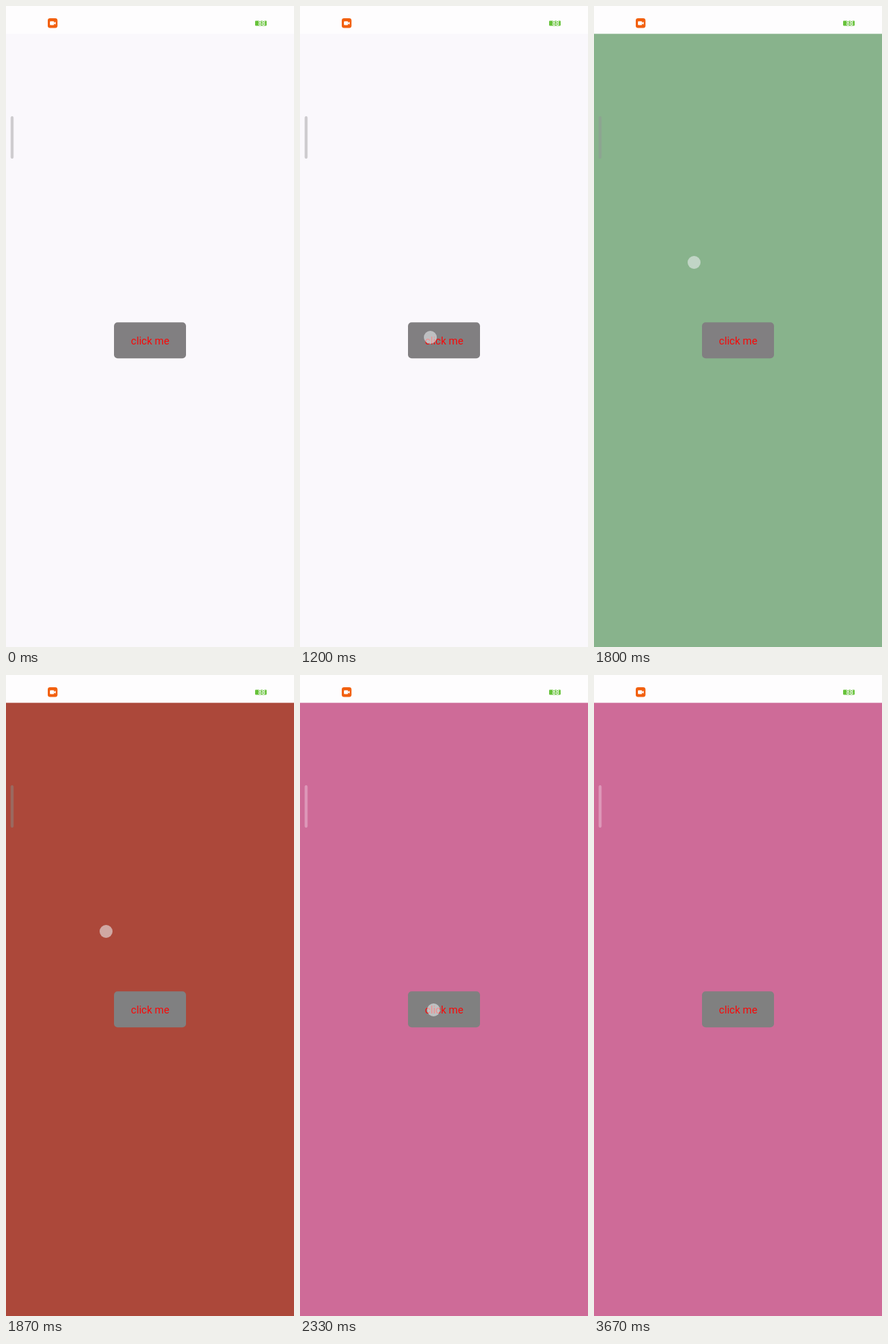
Animation of 400 by 890 pixels, one loop 3.74 s. Source, as an HTML page:

```html
<!DOCTYPE html>
<html lang="en">
<head>
<meta charset="utf-8">
<title>Colour tap</title>
<style>
html, body { margin: 0; width: 100%; height: 100%; overflow: hidden; background: #fefdfe; }
svg { display: block; width: 400px; height: 890px; }
text { font-family: Roboto, "Noto Sans", sans-serif; text-anchor: middle; }
</style>
</head>
<body>
<svg viewBox="0 0 400 890">
  <rect width="400" height="890" fill="#fefdfe"/>
  <rect id="page" y="38.6" width="400" height="851.4"/>

  <g id="status">
    <rect x="58" y="17" width="13.5" height="13.5" rx="3.2" fill="#f2600f"/>
    <rect x="61" y="21.2" width="5.8" height="5.2" rx="1" fill="#fff"/>
    <path d="M67 23.2 L69 21.8 V25.8 L67 24.4 Z" fill="#fff"/>
    <rect x="346" y="20.4" width="16" height="7" rx=".8" fill="#67c23a"/>
    <text x="355.2" y="27" font-size="8.6" font-weight="500" fill="#fff">88</text>
  </g>

  <rect id="bar" x="6.5" y="153" width="4" height="59" rx="2"/>

  <rect id="button" x="150" y="439.3" width="100" height="50" rx="5"/>
  <text x="200.2" y="469.7" font-size="14.4" fill="#f80808">click me</text>

  <circle id="touch" r="9" fill="#ebeef0" fill-opacity=".58"/>
</svg>
<script>
const LOOP = 3740;

// start time, page, side bar, button
const themes = [
  [0, '#faf8fc', '#cdcbce', '#817f81'],
  [1270, '#88b38c', '#8da591', '#817f81'],
  [1870, '#ac483a', '#9a6a60', '#808081'],
  [2330, '#ce6b98', '#dd98b9', '#808080']
];

// press time, release time, x, y
const taps = [
  [1200, 1330, 181, 460],
  [1800, 1930, 139, 356],
  [2270, 2400, 185.5, 465]
];

const el = id => document.getElementById(id);
const [page, bar, button, touch] = ['page', 'bar', 'button', 'touch'].map(el);

function draw(t) {
  const theme = themes.filter(s => s[0] <= t).pop();
  [page, bar, button].forEach((part, i) => part.setAttribute('fill', theme[i + 1]));

  const tap = taps.find(([down, up]) => t >= down && t < up);
  touch.setAttribute('visibility', tap ? 'visible' : 'hidden');
  if (tap) {
    touch.setAttribute('cx', tap[2]);
    touch.setAttribute('cy', tap[3]);
  }
}

const start = performance.now();
function tick() {
  draw((performance.now() - start) % LOOP);
  requestAnimationFrame(tick);
}
tick();
</script>
</body>
</html>
```
